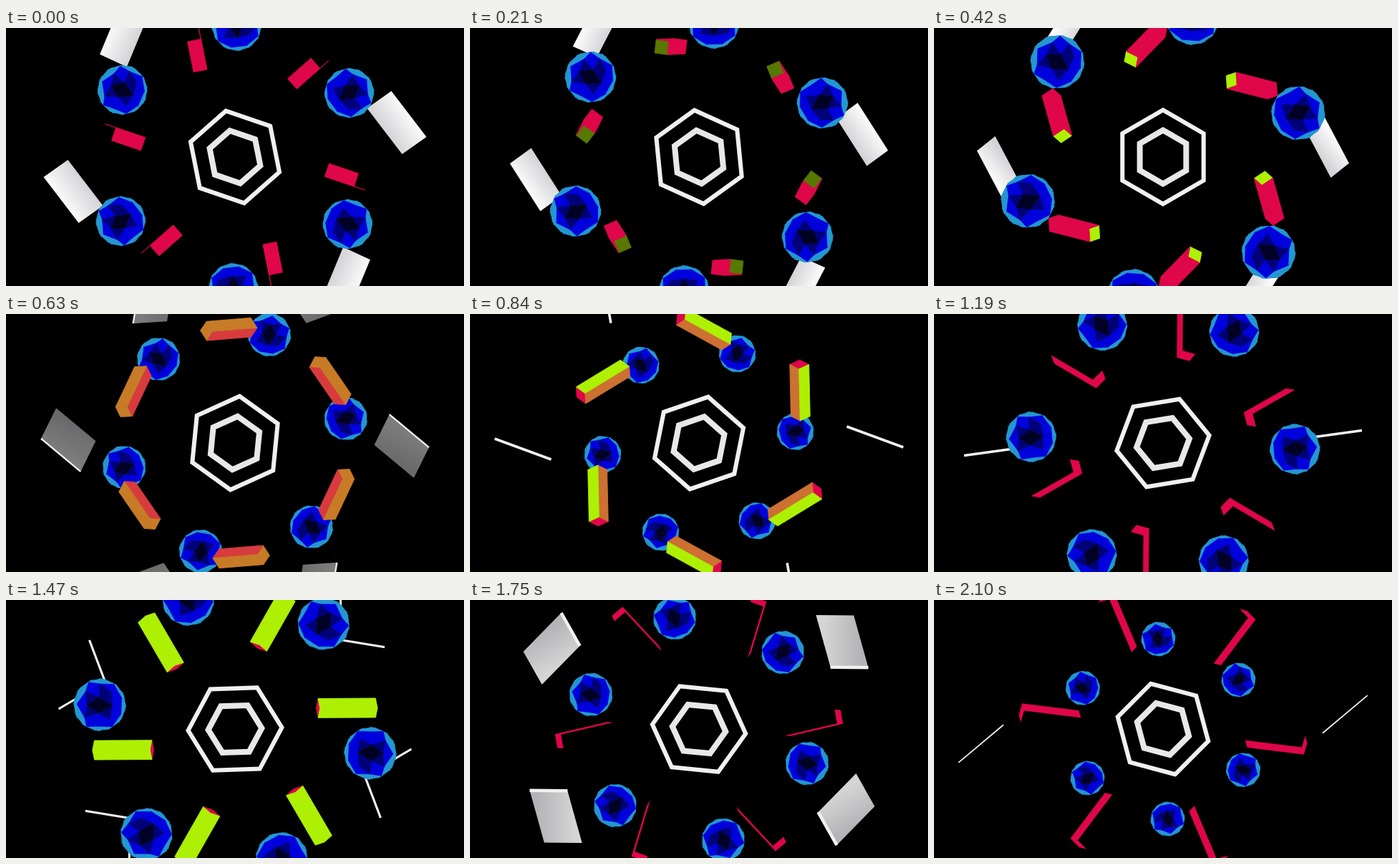
An HTML page with a canvas for the animation above (2.17 s loop, 640x360 px).

```html
<!DOCTYPE html>
<html lang="en">
<head>
<meta charset="utf-8">
<title>Tumbling ring</title>
<style>
  html, body { margin: 0; height: 100%; overflow: hidden; background: #000; }
  canvas { display: block; }
</style>
</head>
<body>
<canvas id="stage" width="640" height="360"></canvas>
<script>
const ctx = document.getElementById('stage').getContext('2d');
const STEP_MS = 70, STEPS = 31, RAD = Math.PI / 180;
const TURN = 1.875 * RAD;              // ring rotation per step
const RED = [224, 6, 74], GREEN = [174, 240, 4], BLACK = [0, 0, 0], MIX = [205, 112, 50];

// Bar poses: long axis, side axis, then colours of the faces across each axis.
const bars = [
  [0, [.5, .17, .85], [-.31, .95, .02], [BLACK, RED, RED]],
  [6, [-.32, -.63, .7], [-.67, .65, .3], [GREEN, RED, RED]],
  [12, [.52, -.71, .47], [-.77, -.2, .6], [RED, MIX, GREEN]],
  [17, [.82, -.02, -.57], [.18, -.91, .37], [RED, RED, BLACK]],
  [21, [.92, .34, -.2], [.37, -.61, .7], [RED, GREEN, GREEN]],
  [25, [.9, 0, .42], [.13, -.99, -.08], [RED, RED, BLACK]],
  [30, [.94, .18, .25], [.3, -.82, -.49], [RED, RED, BLACK]]
];

// Panel poses: centre, two sides, then [face light, edge u, edge v].
const panels = [
  [0, [226, -48], [49, 64], [-34, 24], [1, 0, 0]],
  [6, [229, -15], [36, 68], [-25, 20], [1, .3, 0]],
  [12, [235, 24.5], [79, 29], [-22, 66], [0, 1, 0]],
  [17, [231, 23], [80, -11], [-14, 70], [0, 1, 0]],
  [21, [225, 76], [65, -38], [22, 58], [0, .9, .9]],
  [25, [206, 112], [53, -54], [26, 46], [.85, 0, 1.3]],
  [30, [161, 179], [32, -62], [77, 28], [0, 0, .5]]
].map(([k, c, u, v, light]) => [k, ...[c, u, v].map(p => spin(p, -k * TURN)), light]);

// Ball orbit radius; the depth move repeats every 16 steps.
const orbit = [[0, [183]], [1, [184.5]], [5, [192]], [6, [198.5]],
  [9, [158.5]], [12, [135.5]], [14, [125.7]], [16, [183]]];

function spin([x, y], a) {
  const c = Math.cos(a), s = Math.sin(a);
  return [x * c - y * s, x * s + y * c];
}
const mix = (a, b, f) => Array.isArray(a) ? a.map((v, i) => mix(v, b[i], f)) : a + (b[a, 'length'] === undefined ? b - a : 0) * f;
const lerp = (a, b, f) => Array.isArray(a) ? a.map((v, i) => lerp(v, b[i], f)) : a + (b - a) * f;
const dot = (a, b) => a.reduce((sum, v, i) => sum + v * b[i], 0);
const scale = (a, s) => a.map(v => v * s);
const add = (a, b) => a.map((v, i) => v + b[i]);
const unit = a => scale(a, 1 / Math.hypot(...a));
const cross = (a, b) => [a[1] * b[2] - a[2] * b[1], a[2] * b[0] - a[0] * b[2], a[0] * b[1] - a[1] * b[0]];
const rgb = c => `rgb(${c.map(Math.round)})`;

function pose(keys, k) {
  let i = 0;
  while (i < keys.length - 2 && k >= keys[i + 1][0]) i++;
  const a = keys[i], b = keys[i + 1];
  return lerp(a, b, (k - a[0]) / (b[0] - a[0])).slice(1);
}

function path(points, close = true) {
  ctx.beginPath();
  points.forEach(p => ctx.lineTo(p[0], p[1]));
  if (close) ctx.closePath();
}

function solid(points, color, edge) {
  path(points);
  ctx.fillStyle = ctx.strokeStyle = color;
  ctx.lineWidth = edge;
  ctx.fill();
  ctx.stroke();
}

// Faceted unit ball: an icosahedron split once, shaded by facing.
function makeBall() {
  const g = (1 + Math.sqrt(5)) / 2, verts = [], facets = [];
  for (const s of [-1, 1]) for (const t of [-g, g]) verts.push([0, s, t], [s, t, 0], [t, 0, s]);
  const tilt = 8 * RAD, w = unit([1, 1, 1]), u = unit([1, -1, 0]), v = unit([1, 1, -2]);
  const turn = p => {
    const x = dot(p, u), y = dot(p, v), z = dot(p, w);
    return [x * Math.cos(tilt) - z * Math.sin(tilt), y, x * Math.sin(tilt) + z * Math.cos(tilt)];
  };
  const facet = (...tri) => {
    const pts = tri.map(p => turn(unit(p)));
    const z = unit(pts.reduce(add))[2];
    if (z < 0) return;
    facets.push({ pts, z, color: z > .97 ? '#000024' : z > .8 ? '#000078' : z > .5 ? '#0000dc' : '#2496d0' });
  };
  const near = (a, b) => Math.abs(Math.hypot(...add(a, scale(b, -1))) - 2) < .01;
  verts.forEach((a, i) => verts.forEach((b, j) => verts.forEach((c, n) => {
    if (!(i < j && j < n && near(a, b) && near(b, c) && near(a, c))) return;
    const ab = unit(add(a, b)), bc = unit(add(b, c)), ca = unit(add(c, a));
    facet(a, ab, ca);
    facet(b, bc, ab);
    facet(c, ca, bc);
    facet(ab, bc, ca);
  })));
  return facets.sort((a, b) => a.z - b.z);
}
const ball = makeBall();

function drawBall(r) {
  ctx.save();
  ctx.rotate(30.75 * RAD);
  ctx.translate(r, 0);
  const size = r / 5.25;
  ctx.beginPath();
  for (let i = 0; i < 12; i++) ctx.lineTo(...spin([size, 0], i * 30 * RAD));
  ctx.fillStyle = '#2496d0';
  ctx.fill();
  ball.forEach(f => solid(f.pts.map(p => scale(p, size)), f.color, .5));
  ctx.restore();
}

function drawBar([long, side, colors]) {
  const a = unit(long), b = unit(add(side, scale(a, -dot(side, a))));
  const axes = [scale(a, 41), scale(b, 9.5), scale(cross(b, a), 9.5)];
  const home = [...spin([159, 0], 10 * RAD), 0];
  axes.forEach((axis, i) => {
    const mid = add(home, scale(axis, Math.sign(axis[2])));
    const p = axes[(i + 1) % 3], q = axes[(i + 2) % 3];
    const corner = (s, t) => add(mid, add(scale(p, s), scale(q, t)));
    solid([corner(-1, -1), corner(1, -1), corner(1, 1), corner(-1, 1)], rgb(colors[i]), .8);
  });
}

function drawPanel([c, u, v, [face, edgeU, edgeV]]) {
  const at = (s, t) => add(c, add(scale(u, s / 2), scale(v, t / 2)));
  if (face > .02) {
    const shade = ctx.createLinearGradient(...at(0, 1), ...at(0, -1));
    shade.addColorStop(0, rgb(scale([212, 212, 216], face)));
    shade.addColorStop(1, rgb(scale([250, 250, 250], face)));
    path([at(-1, -1), at(1, -1), at(1, 1), at(-1, 1)]);
    ctx.fillStyle = shade;
    ctx.fill();
  }
  ctx.strokeStyle = '#f2f2f2';
  [[edgeU, at(1, -1)], [edgeV, at(-1, 1)]].forEach(([weight, end]) => {
    if (weight < .02) return;
    path([at(-1, -1), end], false);
    ctx.lineWidth = 3.5 * weight;
    ctx.stroke();
  });
}

function hexagon(r, width, color) {
  path([0, 1, 2, 3, 4, 5].map(i => spin([r, 0], (18.75 + i * 60) * RAD)));
  ctx.lineWidth = width;
  ctx.strokeStyle = color;
  ctx.stroke();
}

function sixfold(draw) {
  for (let i = 0; i < 6; i++) {
    draw();
    ctx.rotate(60 * RAD);
  }
}

function render(k) {
  ctx.setTransform(1, 0, 0, 1, 0, 0);
  ctx.fillStyle = '#000';
  ctx.fillRect(0, 0, 640, 360);
  ctx.translate(320, 180);
  ctx.rotate(k * TURN);
  const panel = pose(panels, k), bar = pose(bars, k), [[r]] = pose(orbit, k % 16);
  sixfold(() => drawPanel(panel));
  sixfold(() => drawBall(r));
  sixfold(() => drawBar(bar));
  hexagon(65.5, 6, '#f0f0f0');
  hexagon(37.4, 8, '#e8e8ea');
}

const start = performance.now();
function tick() {
  render(Math.floor((performance.now() - start) / STEP_MS) % STEPS);
  requestAnimationFrame(tick);
}
tick();
</script>
</body>
</html>
```
